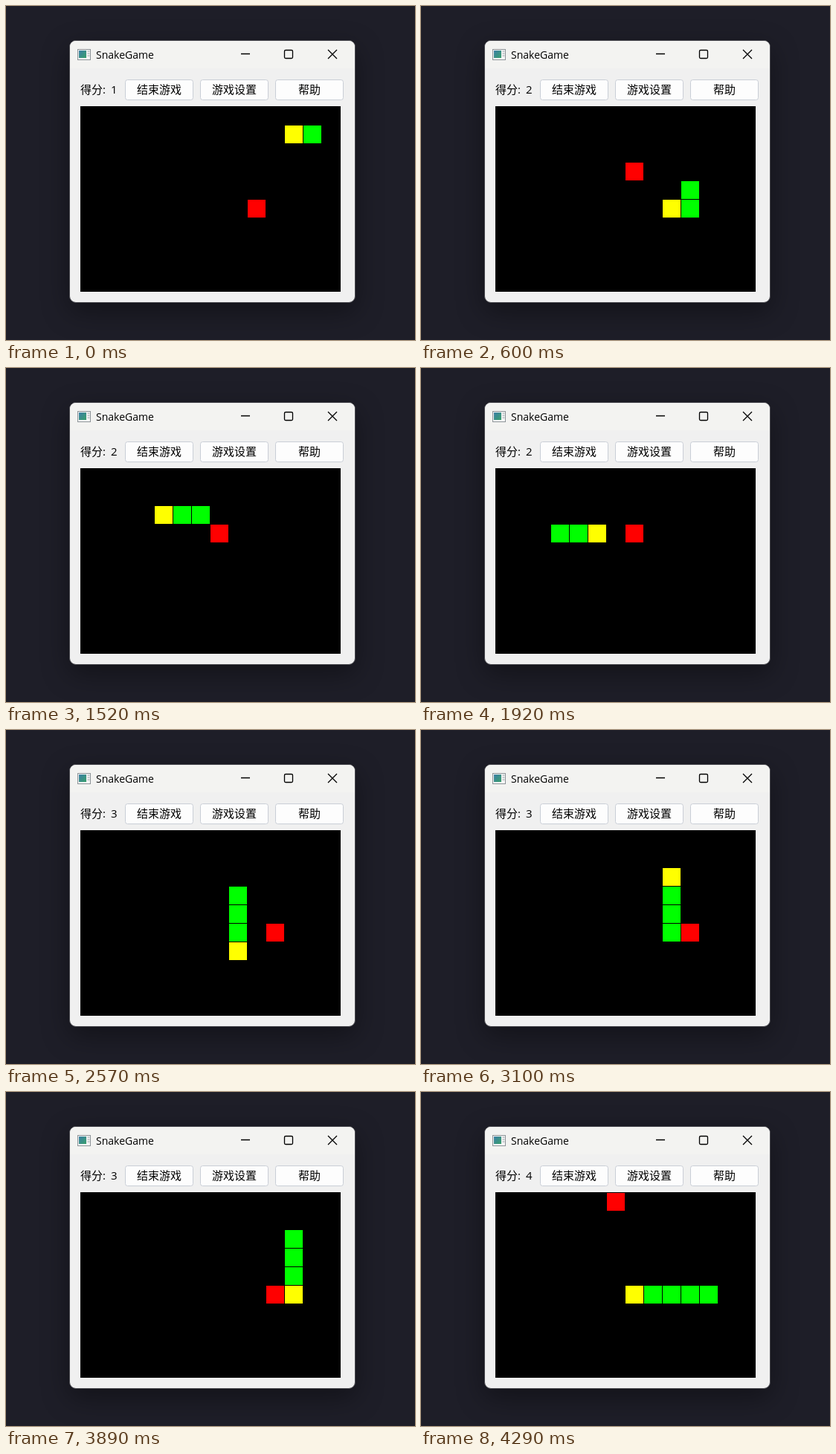
An HTML page that plays this animation: 550x450 px, repeating every 4.42 s.

```html
<!DOCTYPE html>
<html lang="zh-CN">
<head>
<meta charset="utf-8">
<title>SnakeGame</title>
<style>
  html, body { margin: 0; width: 100%; height: 100%; overflow: hidden; background: #1e1e28; }
  svg { display: block; }
  text { font: 15px "Noto Sans CJK SC", "Noto Sans CJK", sans-serif; fill: #000; }
  .latin { font-family: "Open Sans", "Noto Sans", sans-serif; }
  .shadow { filter: drop-shadow(0 12px 18px rgba(0, 0, 0, .38)); }
  .button rect { fill: #fdfdfd; stroke: #c9ced6; }
  .button text { text-anchor: middle; }
  .controls { fill: none; stroke: #000; stroke-width: 1.3; }
</style>
</head>
<body>
<svg width="550" height="450" viewBox="0 0 550 450">
  <defs>
    <linearGradient id="screen" x2="1" y2="1">
      <stop stop-color="#3c7fa6"/>
      <stop offset="1" stop-color="#39a06c"/>
    </linearGradient>
  </defs>
  <rect width="550" height="450" fill="#1e1e28"/>
  <rect class="shadow" x="85.5" y="46.5" width="384" height="353" rx="8.5" fill="#f0f0f0" stroke="#4a4a50"/>
  <path d="M86 84V55a8 8 0 0 1 8-8h367a8 8 0 0 1 8 8v29z" fill="#f3f3f1"/>

  <rect x="96.5" y="58.5" width="17" height="14" fill="#f4f4f4" stroke="#8d9498"/>
  <rect x="98" y="60" width="10" height="10" fill="url(#screen)"/>
  <path d="M109.5 61h3M109.5 64h3M109.5 67h3" stroke="#9aa3a8"/>
  <text class="latin" x="121" y="71" style="font-size:14px">SnakeGame</text>
  <g class="controls">
    <path d="M316 64.5h12M433 59l12 12M445 59l-12 12"/>
    <rect x="374.5" y="59.5" width="11" height="11" rx="1.5"/>
  </g>

  <text x="100" y="118">得分</text>
  <text class="latin" x="130" y="118">:</text>
  <text class="latin" id="score" x="141" y="118"></text>
  <g id="buttons"></g>
  <rect x="100" y="135" width="350" height="250"/>
  <g id="board"></g>
</svg>
<script>
  const LOOP = 4420, SLOT = LOOP / 67, SLOTS_PER_MOVE = 1.64;
  const STEP = { L: [-1, 0], R: [1, 0], U: [0, -1], D: [0, 1] };
  const ROUTE = 'LLDDDDLLUUULLLLLDRRRRRDDDRUUUUURRDDDDLLLL';
  const FOOD = [[9, 5], [7, 3], [10, 5], [6, 0]];
  const EATEN_AT = [6, 20, 37];
  const byId = id => document.getElementById(id);

  const path = [[12, 1]];
  for (const move of ROUTE) {
    const [x, y] = path[path.length - 1], [dx, dy] = STEP[move];
    path.push([x + dx, y + dy]);
  }

  byId('buttons').innerHTML = ['结束游戏', '游戏设置', '帮助'].map((label, i) => {
    const x = 160 + 101 * i;
    return `<g class="button"><rect x="${x + .5}" y="99.5" width="91" height="27" rx="3"/>
      <text x="${x + 46}" y="118">${label}</text></g>`;
  }).join('');

  const cell = ([x, y], color) =>
    `<rect x="${100 + 25 * x}" y="${136 + 25 * y}" width="24" height="24" fill="${color}"/>`;

  // Moves land on the screen's refresh slots, so they alternate between one and two slots long.
  function moveAt(time) {
    const slot = Math.min(66, Math.floor((time % LOOP + 6) / SLOT));
    return Math.ceil((slot + .9) / SLOTS_PER_MOVE) - 1;
  }

  let shown = -1;
  function draw(move) {
    const eaten = EATEN_AT.filter(m => m <= move).length;
    const head = move + 1;
    const body = path.slice(head - eaten - 1, head);
    byId('score').textContent = eaten + 1;
    byId('board').innerHTML = cell(FOOD[eaten], '#f00') +
      body.map(p => cell(p, '#0f0')).join('') + cell(path[head], '#ff0');
  }

  const start = performance.now();
  function tick() {
    const move = moveAt(performance.now() - start);
    if (move !== shown) draw(shown = move);
    requestAnimationFrame(tick);
  }
  tick();
</script>
</body>
</html>
```
